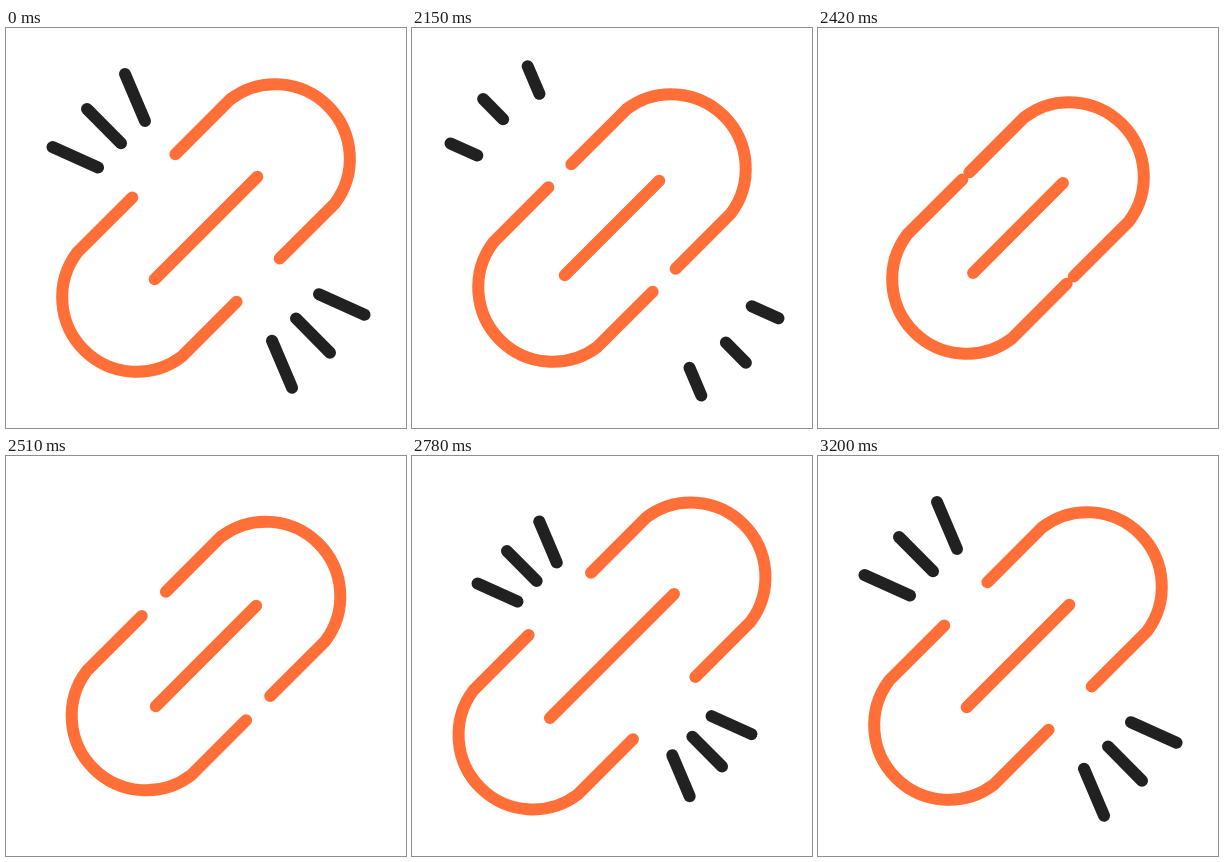
Recreate the animation shown at these times as an HTML page. Size 400x400 px, loop 3.23 s.

```html
<!DOCTYPE html>
<html lang="en">
<head>
<meta charset="utf-8">
<title>Link</title>
<style>
  html, body { margin: 0; width: 100%; height: 100%; overflow: hidden; background: #fff; }
  svg { display: block; width: 100vw; height: 100vh; }
  path { fill: none; stroke-width: 12; stroke-linecap: round; stroke-linejoin: round; }
  .link { stroke: #ff6f37; }
  .ray { stroke: #212121; }
</style>
</head>
<body>
<svg viewBox="0 0 400 400">
  <defs>
    <path id="half" d="M-100.3-4L-45.1-59.2A74.5 74.5 0 0 1 59.2 45.1L4 100.3"/>
    <g id="rays" class="ray"><path/><path/><path/></g>
  </defs>
  <g class="link">
    <use id="upper" href="#half"/>
    <use id="lower" href="#half"/>
    <path id="bar"/>
  </g>
  <use href="#rays"/>
  <use href="#rays" transform="rotate(180 202.5 202.85)"/>
</svg>
<script>
const LOOP = 3230, REST = 2000, STEP = 30;
const CLOSED = 320, OPEN = 760, END = 1200;
const GONE = 340, BURST = 605;

// Outer end, inner end, distance flown outwards, distance of the burst's origin
const RAYS = [
  { from: [119, 46], to: [139, 93], out: -20.5, origin: 85 },
  { from: [81, 81], to: [115, 115.3], out: -34, origin: 80 },
  { from: [46.5, 119], to: [92, 139.5], out: -21.2, origin: 84 }
];

const $ = id => document.getElementById(id);
const rayPaths = document.querySelectorAll('#rays path');
const progress = (t, a, b) => Math.min(1, Math.max(0, (t - a) / (b - a)));
const smooth = u => u * u * (3 - 2 * u);
const mix = (a, b, u) => a + (b - a) * u;

// Rest -> low -> high -> rest
function swing(t, low, high) {
  if (t < CLOSED) return mix(0, low, smooth(progress(t, 0, CLOSED)));
  if (t < OPEN) return mix(low, high, smooth(progress(t, CLOSED, OPEN)));
  return mix(high, 0, smooth(progress(t, OPEN, END)));
}

function drawRay(path, { from, to, out, origin }, t) {
  const dx = to[0] - from[0], dy = to[1] - from[1], len = Math.hypot(dx, dy);
  let outer, inner;
  if (t < GONE) {
    const u = smooth(progress(t, 0, GONE));
    outer = mix(0, out, u);
    inner = mix(len, out, u);
  } else {
    const left = 1 - progress(t, BURST, END);
    outer = mix(0, origin, left ** 4);
    inner = mix(len, origin, left ** 2.4);
  }
  const at = s => `${from[0] + dx * s / len} ${from[1] + dy * s / len}`;
  const hidden = t >= GONE && t <= BURST;
  path.setAttribute('d', hidden ? '' : `M${at(outer)}L${at(inner)}`);
}

function render(now) {
  const t = Math.max(0, Math.floor((now % LOOP - REST) / STEP) * STEP);
  const shift = swing(t, -22.2, 9.7);
  const move = `translate(${269.7 + shift} ${130.3 - shift})`;
  $('upper').setAttribute('transform', move);
  $('lower').setAttribute('transform', `rotate(180 200 200) ${move}`);
  const h = 51.3 + swing(t, -9, 10.8);
  $('bar').setAttribute('d', `M${200 - h} ${200 + h}L${200 + h} ${200 - h}`);
  RAYS.forEach((ray, i) => drawRay(rayPaths[i], ray, t));
}

const start = performance.now();
function tick() {
  render(performance.now() - start);
  requestAnimationFrame(tick);
}
tick();
</script>
</body>
</html>
```
